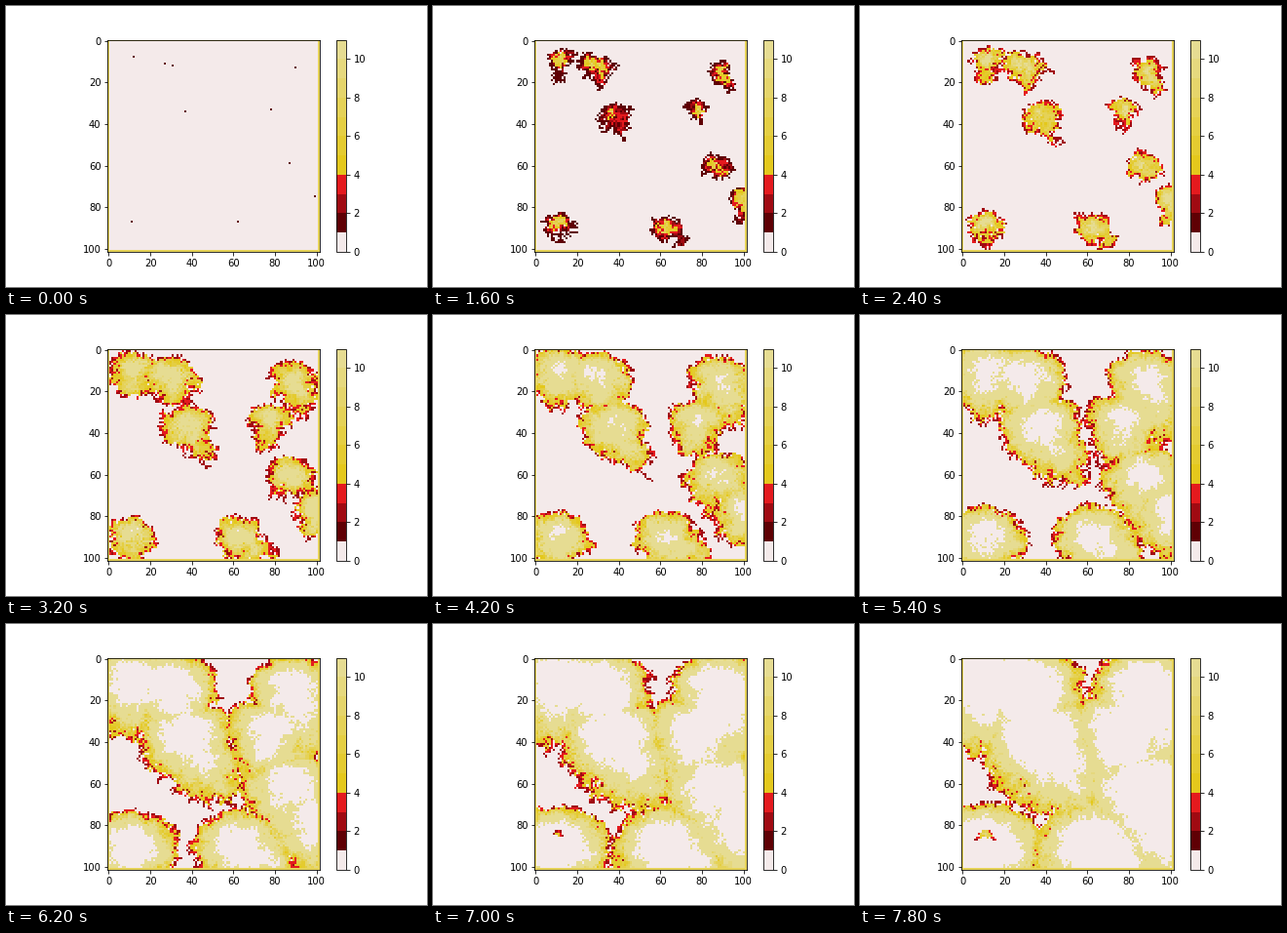
These frames come from a looping animation (432x288 px, 8000 ms). A matplotlib script:

```python
import random

import matplotlib.pyplot as plt
import numpy as np
from matplotlib.animation import FuncAnimation
from matplotlib.colors import ListedColormap

N = 100          # living cells per side, framed by a fixed border
STEPS = 40
EDGE = 7
TOP = 10
LEAN_STEPS = 12
LEFT, RIGHT, UP, DOWN = 0.8, 0.78, 0.5, 1.05   # cells per step

# First sick cell (x, y) and how far its patch drifts early on
SEEDS = [(12, 8, -3, 4), (27, 11, 0, 6), (31, 12, 6, 8), (90, 13, 5, 20),
         (37, 34, 14, 19), (78, 33, 4, 8), (87, 59, 10, 10), (99, 75, 0, 4),
         (11, 87, 0, 6), (62, 87, 16, 12)]


def smooth_noise(rng, passes=4):
    """Blurred random field with unit spread."""
    f = rng.normal(size=(N + 2, N + 2))
    for _ in range(passes):
        for axis in (0, 1):
            f = (np.roll(f, 1, axis) + f + np.roll(f, -1, axis)) / 3
    return f / f.std()


def front_time(X, Y):
    """Step at which the front should reach each cell."""
    T = np.full(X.shape, np.inf)
    for x, y, lean_x, lean_y in SEEDS:
        for k in range(LEAN_STEPS + 1):
            dx = X - x - lean_x * k / LEAN_STEPS
            dy = Y - y - lean_y * k / LEAN_STEPS
            dx = dx / np.where(dx < 0, LEFT, RIGHT)
            dy = dy / np.where(dy < 0, UP, DOWN)
            T = np.minimum(T, k + np.hypot(dx, dy))
    return T


def spread(T, rand):
    """Step at which each cell falls ill; cells update in reading order."""
    start = np.full(T.shape, np.inf)
    ill = [[False] * (N + 2) for _ in range(N + 2)]
    for x, y, *_ in SEEDS:
        ill[y][x] = True
        start[y, x] = 0
    for n in range(1, STEPS):
        odds = np.clip(0.36 + 0.11 * (n - T), 0, 0.92).tolist()
        for y in range(1, N + 1):
            up, row, down = ill[y - 1:y + 2]
            for x in range(1, N + 1):
                if row[x] or odds[y][x] == 0:
                    continue
                near = (row[x - 1] or row[x + 1]
                        or True in up[x - 1:x + 2]
                        or True in down[x - 1:x + 2])
                if near and rand.random() < odds[y][x]:
                    row[x] = True
                    start[y, x] = n
    return start


def relapse(X, Y, rng):
    """A small arc that falls ill a second time."""
    side = np.abs(X - 11)
    off = np.abs(Y - 84 - 0.13 * side ** 2)
    when = np.round(29 + 1.3 * side + 2 * off + rng.uniform(0, 2, X.shape))
    hit = (side <= 7) & (off < 2) & (rng.random(X.shape) < 0.8)
    return np.where(hit, when, np.inf)


rng = np.random.default_rng(4)
Y, X = np.mgrid[0:N + 2, 0:N + 2].astype(float)
start = spread(front_time(X, Y) + 1.8 * smooth_noise(rng), random.Random(11))
length = np.round(rng.normal(17.5, 0.8, X.shape))
again = relapse(X, Y, rng)


def stage(n, begin):
    return np.where(n >= begin, np.clip(n - begin, 1, TOP), 0)


def cells(n):
    grid = np.where(n - start < length, stage(n, start), 0)
    grid = np.where(n >= again, stage(n, again), grid)
    grid[[0, -1], :] = EDGE
    grid[:, [0, -1]] = EDGE
    return grid


reds = [(244, 234, 234), (95, 0, 4), (160, 10, 18), (228, 26, 30)]
yellows = np.linspace((228, 200, 28), (230, 220, 146), 7)
cmap = ListedColormap(np.vstack([reds, yellows]) / 255)

plt.rcParams.update({"font.family": "DejaVu Sans", "font.size": 10})
fig, ax = plt.subplots(figsize=(6, 4), dpi=72, facecolor="white")
fig.subplots_adjust(left=0.125, right=0.9, bottom=0.125, top=0.88)
image = ax.imshow(cells(0), cmap=cmap, vmin=0, vmax=11,
                  interpolation="nearest")
ax.set_xticks(range(0, 101, 20))
ax.set_yticks(range(0, 101, 20))
fig.colorbar(image, ax=ax, ticks=range(0, 11, 2))


def draw(n):
    image.set_data(cells(n))
    return [image]


anim = FuncAnimation(fig, draw, frames=STEPS, interval=200,
                     repeat=True, repeat_delay=0)
plt.show()
```
